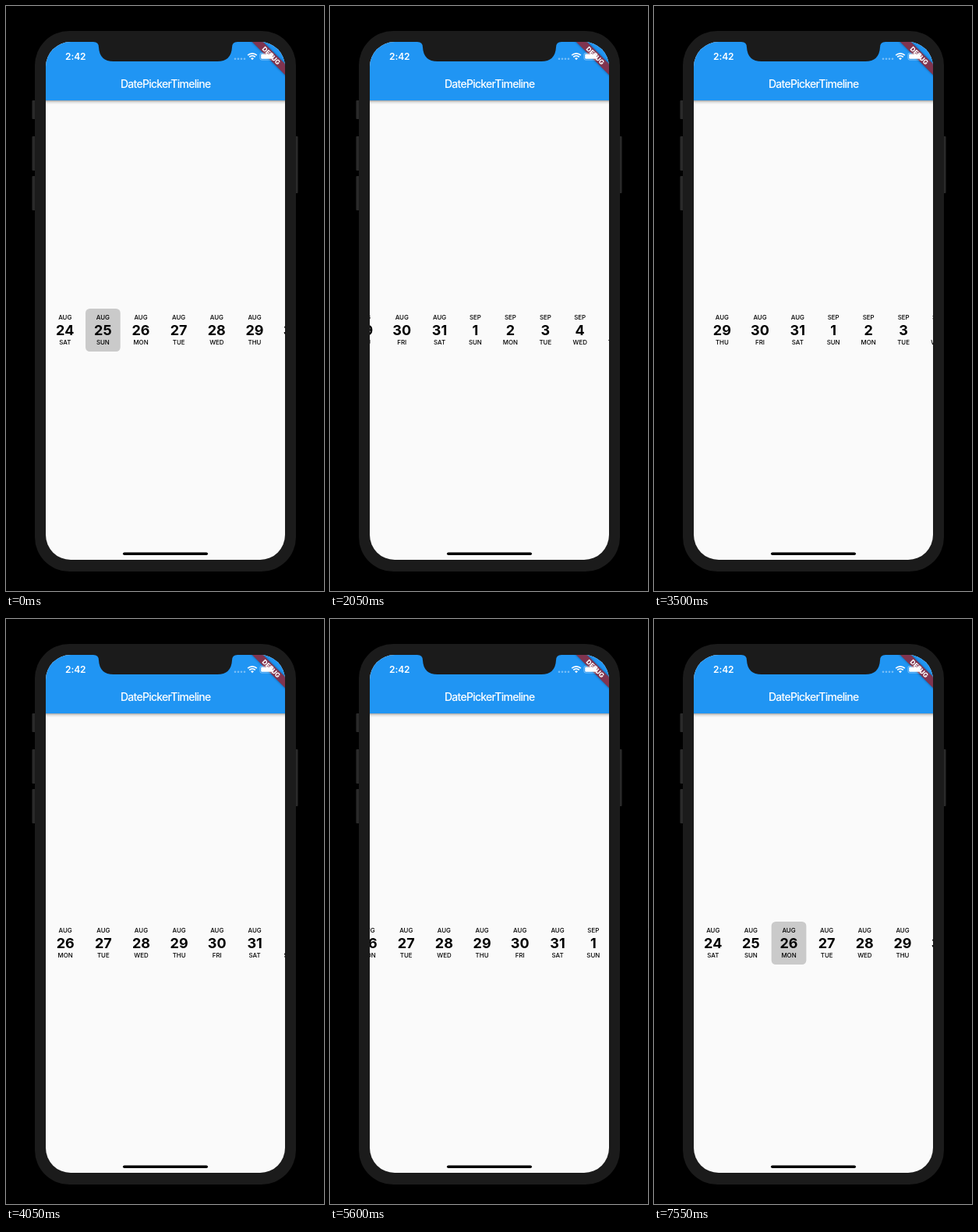
Animation of 408 by 750 pixels, one loop 8000 ms. Source, as an HTML page:

```html
<!DOCTYPE html>
<html lang="en">
<head>
<meta charset="utf-8">
<title>Date picker timeline</title>
<style>
  html, body { margin: 0; width: 100%; height: 100%; overflow: hidden; background: #000; }
  svg { display: block; width: 408px; height: 750px; }
  text { font-family: Inter, Roboto, sans-serif; text-anchor: middle; }
  .small { font-size: 7.9px; font-weight: 500; }
  .day { font-size: 18px; font-weight: 700; }
</style>
</head>
<body>
<svg viewBox="0 0 408 750">
  <defs>
    <clipPath id="screen"><rect x="51" y="46" width="307" height="664" rx="32"/></clipPath>
    <linearGradient id="shade" x2="0" y2="1">
      <stop stop-color="#000" stop-opacity=".36"/>
      <stop offset=".4" stop-color="#000" stop-opacity=".12"/>
      <stop offset="1" stop-color="#000" stop-opacity="0"/>
    </linearGradient>
    <filter id="blur" x="-20%" y="-100%" width="140%" height="300%"><feGaussianBlur stdDeviation="1.8"/></filter>
  </defs>

  <!-- phone body and buttons -->
  <g fill="#2a2a2a">
    <rect x="33.5" y="121" width="5" height="24" rx="1"/>
    <rect x="33.5" y="167" width="5" height="44" rx="1"/>
    <rect x="33.5" y="218" width="5" height="44" rx="1"/>
    <rect x="369" y="167" width="5.5" height="73" rx="1"/>
  </g>
  <rect x="37" y="32" width="335" height="693" rx="44" fill="#1b1b1b"/>

  <g clip-path="url(#screen)">
    <rect x="51" y="46" width="307" height="664" fill="#fafafa"/>
    <g id="list"></g>
    <rect x="51" y="121" width="307" height="5" fill="url(#shade)"/>
    <rect x="51" y="46" width="307" height="75" fill="#2095f3"/>
    <text x="204.7" y="105" font-size="14" font-weight="500" letter-spacing="-.75" fill="#fff">DatePickerTimeline</text>

    <!-- corner ribbon -->
    <g transform="translate(340.4 63.6) rotate(45)">
      <rect x="-45" y="-4.9" width="90" height="9.8" opacity=".45" filter="url(#blur)"/>
      <rect x="-45" y="-4.9" width="90" height="9.8" fill="#80344f"/>
      <text y="3" font-size="8.3" font-weight="800" fill="#fff">DEBUG</text>
    </g>

    <!-- status bar -->
    <text x="89.3" y="69.2" font-size="12" font-weight="600" letter-spacing="-.1" fill="#fff">2:42</text>
    <g fill="#fff">
      <g opacity=".4">
        <circle cx="294" cy="67.7" r="1.3"/><circle cx="298" cy="67.7" r="1.3"/>
        <circle cx="302" cy="67.7" r="1.3"/><circle cx="306" cy="67.7" r="1.3"/>
      </g>
      <path d="M316 69.2l-2-2.1a2.9 2.9 0 0 1 4 0z"/>
      <path d="M312.2 65.4a5.5 5.5 0 0 1 7.6 0M310.2 63.2a8.4 8.4 0 0 1 11.6 0" fill="none" stroke="#fff" stroke-width="1.6"/>
      <rect x="325.9" y="60.3" width="17.4" height="8.8" rx="2.2" fill="none" stroke="#fff" stroke-width=".8" opacity=".5"/>
      <rect x="327.2" y="61.6" width="14.8" height="6.2" rx="1.2"/>
    </g>
    <rect x="150" y="700.4" width="109" height="3.6" rx="1.8"/>
  </g>
  <path fill="#1b1b1b" d="M112 45V46Q119 46 119 53Q120 71 138 71H271Q289 71 290 53Q290 46 297 46V45Z"/>
</svg>

<script>
const LOOP = 8000;
const DAYS = ['SUN', 'MON', 'TUE', 'WED', 'THU', 'FRI', 'SAT'];
const SEP_WIDTHS = [43.6, 46.5, 43.4, 45.2, 44, 42.5, 42.7];

// [time in ms, scroll offset in px]
const SCROLL = [
  [0, 0], [200, 0], [550, 16], [700, 16], [850, 18], [1200, 42], [1550, 60], [1600, 62],
  [2050, 275], [2450, 410], [2850, 450], [3200, 365], [3500, 232], [3850, 125],
  [4150, 92], [4450, 400], [4750, 671], [4830, 672], [5200, 425], [5600, 124.5],
  [5850, 4], [6050, -24], [6350, -7], [6650, -.5], [6850, 0], [LOOP, 0]
];

const list = document.getElementById('list');

function add(tag, attrs, parent, text = '') {
  const node = document.createElementNS('http://www.w3.org/2000/svg', tag);
  for (const name in attrs) node.setAttribute(name, attrs[name]);
  node.textContent = text;
  return parent.appendChild(node);
}

const mark = add('rect', { y: 388, width: 44.7, height: 55, rx: 5.5, fill: '#cacaca' }, list);
const centers = [];
let left = 51.4;
for (let i = 0; i < 28; i++) {
  const inAugust = i < 8;
  const date = inAugust ? 24 + i : i - 7;
  const weekday = (i + 6) % 7;
  const width = inAugust ? (date < 31 ? 48.65 : 48) : date > 9 ? 46.4 : SEP_WIDTHS[weekday];
  const x = left + width / 2;
  centers.push(x);
  add('text', { x, y: 402.4, class: 'small' }, list, inAugust ? 'AUG' : 'SEP');
  add('text', { x, y: 422, class: 'day' }, list, date);
  add('text', { x, y: 433.6, class: 'small' }, list, DAYS[weekday]);
  left += width;
}

const slope = i => (SCROLL[i + 1][1] - SCROLL[i][1]) / (SCROLL[i + 1][0] - SCROLL[i][0]);

// harmonic mean keeps the curve from overshooting its keys
function tangent(i) {
  if (i === 0 || i === SCROLL.length - 1) return 0;
  const a = slope(i - 1), b = slope(i);
  return a * b > 0 ? 2 * a * b / (a + b) : 0;
}

function offsetAt(t) {
  const i = SCROLL.findIndex(key => key[0] > t) - 1;
  const [t0, y0] = SCROLL[i], [t1, y1] = SCROLL[i + 1];
  const d = t1 - t0, u = (t - t0) / d, v = 1 - u;
  return y0 * v * v * (1 + 2 * u) + y1 * u * u * (1 + 2 * v)
    + d * u * v * (tangent(i) * v - tangent(i + 1) * u);
}

function draw() {
  const t = performance.now() % LOOP;
  list.setAttribute('transform', `translate(${-offsetAt(t)} 0)`);
  mark.setAttribute('x', centers[t < 7350 ? 1 : 2] - 22.35);
  requestAnimationFrame(draw);
}
draw();
</script>
</body>
</html>
```
